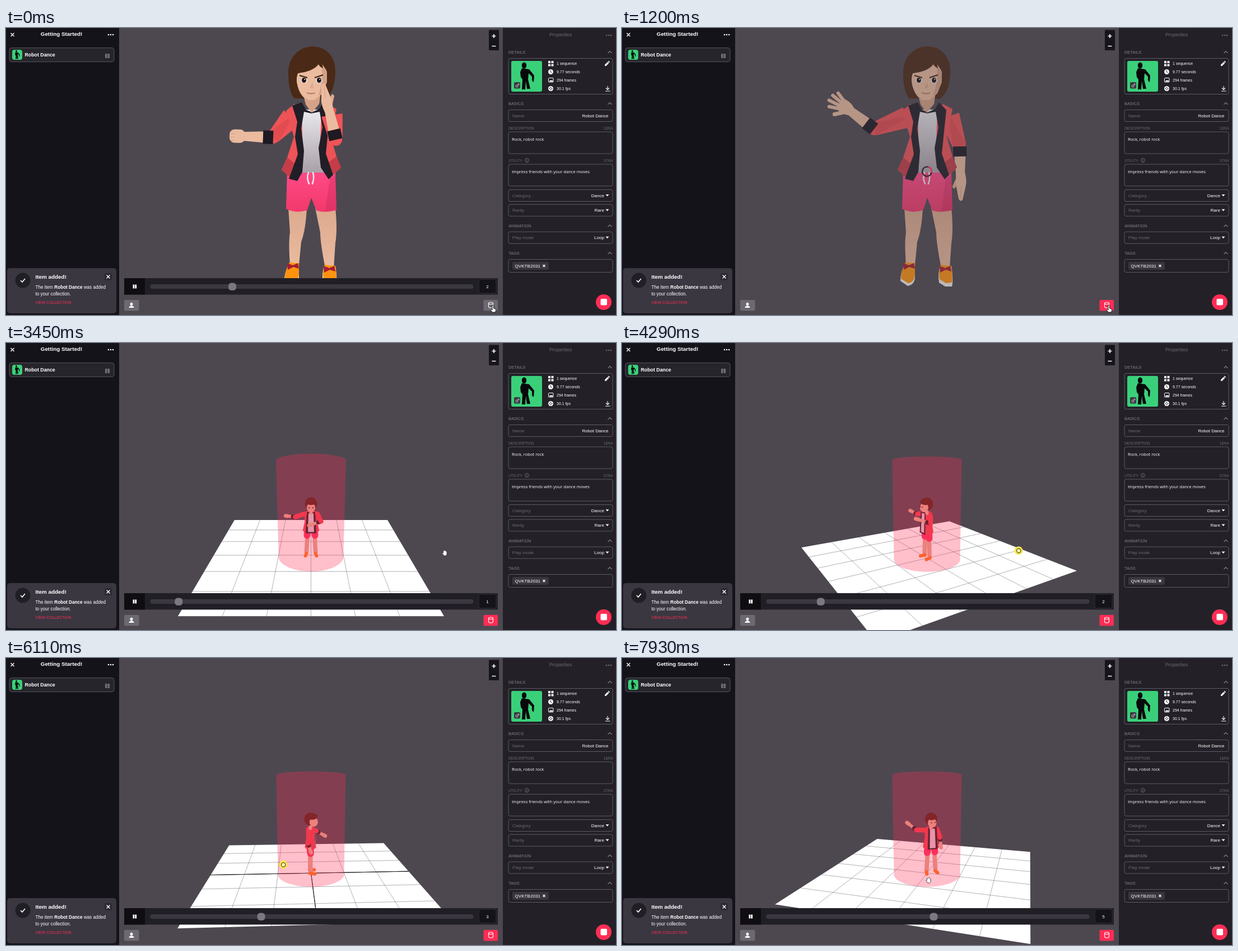
Write an HTML page with a canvas that moves like this. It is 1089 px wide and 514 px high and loops after 8 s.

```html
<!DOCTYPE html>
<html lang="en">
<head>
<meta charset="utf-8">
<title>Dance editor</title>
<style>
html, body { margin: 0; width: 100%; height: 100%; overflow: hidden; background: #4d4850; }
canvas { display: block; }
</style>
</head>
<body>
<canvas id="stage" width="1089" height="514"></canvas>
<script>
const g = document.getElementById('stage').getContext('2d');
const LOOP = 8000, LOAD = 930, SCENE = 2580, RATE = 0.0554;
const BG = '#4d4850', RED = '#ff2d55', INK = '#232028', SKIN = '#eabb9f', COAT = '#ee5357';
const SANS = '"Liberation Sans", Arial, sans-serif', HUMAN = '"Open Sans", sans-serif';

// ---------- helpers ----------
const lerp = (a, b, k) => a + (b - a) * k;
function at(keys, t) {
  if (t <= keys[0][0]) return keys[0].slice(1);
  const i = keys.findIndex(k => k[0] > t);
  if (i < 0) return keys[keys.length - 1].slice(1);
  const a = keys[i - 1], b = keys[i], k = (t - a[0]) / (b[0] - a[0]);
  return a.slice(1).map((v, j) => lerp(v, b[j + 1], k));
}
function paint(path, fill, stroke, width = 1) {
  if (fill) { g.fillStyle = fill; g.fill(path); }
  if (stroke) { g.strokeStyle = stroke; g.lineWidth = width; g.stroke(path); }
}
const shape = (d, fill, stroke, width) => paint(new Path2D(d), fill, stroke, width);
function box(x, y, w, h, r, fill, stroke) {
  const p = new Path2D();
  p.roundRect(x, y, w, h, r);
  paint(p, fill, stroke);
}
function oval(x, y, rx, ry, fill, stroke, width) {
  const p = new Path2D();
  p.ellipse(x, y, rx, ry, 0, 0, 7);
  paint(p, fill, stroke, width);
}
function poly(pts, fill, stroke, width) {
  const p = new Path2D();
  pts.forEach(q => p.lineTo(q[0], q[1]));
  p.closePath();
  paint(p, fill, stroke, width);
}
function text(s, x, y, size, color, { bold = false, align = 'left', font = SANS } = {}) {
  g.font = `${bold ? 'bold ' : ''}${size}px ${font}`;
  g.textAlign = align;
  g.textBaseline = 'middle';
  g.fillStyle = color;
  g.fillText(s, x, y + 0.5);
  return x + g.measureText(s).width;
}
function fade(y0, y1, a, b) {
  const f = g.createLinearGradient(0, y0, 0, y1);
  f.addColorStop(0, a);
  f.addColorStop(1, b);
  return f;
}
const cross = (x, y, r, color = '#fff') =>
  shape(`M${x - r},${y - r}l${2 * r},${2 * r}m0,${-2 * r}l${-2 * r},${2 * r}`, null, color, 1.4);

// ---------- large figure ----------
const HANDS = {
  fist() {
    box(-3, -12, 28, 24, 9, SKIN);
    shape('M15,-8h8M16,-2h8M15,4h8', null, '#d19f86', 1);
  },
  flat() {
    shape('M5,6L24,15L28,12L18,2Z', '#dda98d');
    shape('M-2,-8Q14,-12 24,-9L48,-3Q52,1 46,4L22,8L-2,8Z', SKIN);
    shape('M24,-1L46,1', null, '#d3a18a', 1);
  },
  spread() {
    shape('M-3,-8Q8,-14 22,-12L23,10Q8,14 -3,8Z', SKIN);
    g.lineCap = 'round';
    shape('M18,-9L34,-17M20,-4L41,-8M20,2L41,3M18,7L36,12', null, SKIN, 6);
    shape('M6,-8L18,-22', null, SKIN, 7);
    g.lineCap = 'butt';
  }
};
function arm(sx, sy, ex, ey, wx, wy, hand) {
  const across = (dx, dy, w) => { const l = Math.hypot(dx, dy) || 1; return [-dy / l * w, dx / l * w]; };
  const len = Math.hypot(wx - ex, wy - ey), k = Math.min(0.8, 18 / len);
  const cx = lerp(ex, wx, k), cy = lerp(ey, wy, k);
  const strip = (x0, y0, a, x1, y1, b, fill) => poly(
    [[x0 + a[0], y0 + a[1]], [x1 + b[0], y1 + b[1]], [x1 - b[0], y1 - b[1]], [x0 - a[0], y0 - a[1]]], fill);
  const s = across(ex - sx, ey - sy, 19), e = across(wx - ex, wy - ey, 12), w = across(wx - ex, wy - ey, 8);
  oval(ex, ey, 11, 11, COAT);
  const up = across(ex - sx, ey - sy, 12);
  strip(sx, sy, s, ex, ey, up, COAT);
  strip(sx, sy, [s[0] * 0.1, s[1] * 0.1], ex, ey, up, 'rgba(150,35,45,.14)');
  strip(cx, cy, w.map(v => v * 1.25), wx, wy, w, SKIN);
  strip(ex, ey, e, cx, cy, e, '#1d1a22');
  g.save();
  g.translate(wx, wy);
  g.rotate(Math.atan2(wy - ey, wx - ex));
  HANDS[hand]();
  g.restore();
}
const DANCE = [
  [70, 477, 196, 424, 194, 589, 200, 577, 148],
  [420, 480, 204, 430, 215, 596, 200, 574, 165],
  [900, 496, 216, 486, 262, 606, 202, 580, 222]
];
const WAVE = [450, 181, 407, 148, 603, 212, 604, 260];

function head(dx) {
  g.save();
  g.translate(dx, 0);
  shape('M504,82C503,55 521,33 548,33C575,34 589,54 588,80C587,104 581,120 569,127L514,126C506,114 504,98 504,82Z', '#4a2a16');
  shape('M530,116L535,137L546,152L559,136L562,116Z', '#d6a287');
  shape('M519,82L519,96Q521,112 530,123L540,129H551L565,117L573,95L572,76L562,61Q548,72 519,82Z', SKIN);
  shape('M563,66L573,78V97L566,115L557,122Q568,92 563,66Z', '#d3a189');
  shape('M505,92Q508,70 530,58Q552,50 561,44L566,72Q560,70 558,65Q548,78 521,81Q517,93 519,108Q508,105 505,92Z', '#4a2a16');
  for (const x of [532, 559]) {
    oval(x, 94, 6, 4.5, '#f3e4dc');
    oval(x, 93.5, 4, 4.5, '#17131a');
    oval(x + 1.2, 92, 1, 1, '#fff');
  }
  shape('M524,85L538,89M551,89L566,84', null, '#38200f', 2);
  shape('M547,97L542,107L549,108Z', '#dba88e');
  shape('M537,116Q545,119 552,116', null, '#b9725f', 1.8);
  g.restore();
}
function dancer(t) {
  const waving = t >= LOAD, pose = waving ? WAVE : at(DANCE, t);
  // legs and shoes
  shape('M504,322L537,322Q535,362 527,383L523,424H507Q504,384 507,366Z', fade(320, 425, '#dca98e', SKIN));
  shape('M552,322H588Q592,362 588,385L585,430H570Q561,385 561,366Z', fade(320, 430, '#dca98e', SKIN));
  shape('M506,420Q496,441 497,453L510,462Q522,460 523,447V421Z', '#f3f0f0');
  shape('M506,420Q497,438 498,449L511,457Q521,456 523,442V421Z', '#ff930f');
  shape('M569,424Q563,438 566,456L577,463H589Q592,452 588,426Z', '#f3f0f0');
  shape('M569,424Q564,437 567,450L578,457L589,456Q591,446 588,426Z', '#ff930f');
  for (const [x, y] of [[512, 427], [577, 432]])
    shape(`M${x - 10},${y - 6}l10,4l9,-4l2,10l-10,-3l-10,5z`, '#a51c33');
  // shorts
  shape('M502,258L500,324Q519,333 538,326L545,304L554,327Q573,332 590,326L588,258Z', fade(260, 328, '#ff4a86', '#f2396c'));
  shape('M578,270L570,328L590,326V262Z', 'rgba(150,20,70,.18)');
  if (waving) arm(508, 160, ...pose.slice(0, 4), 'spread');
  else arm(510, 160, ...pose.slice(0, 4), 'fist');
  if (waving) arm(584, 158, ...pose.slice(4), 'flat');
  // jacket, shirt, collar
  shape('M524,146H567L563,200L570,259H524L527,200Z', fade(150, 258, '#e9e7ec', '#aaa1a8'));
  shape('M515,136L500,148L514,195L502,232L492,254L512,272L530,230L528,150Z', COAT);
  shape('M573,136L590,145L580,195L590,230L598,250L576,270L560,230L563,150Z', COAT);
  shape('M502,232L492,254L512,272L518,245ZM590,230L598,250L576,270L570,245Z', '#c53d49');
  shape('M528,133L511,139L520,168L516,195L521,226L505,270L520,274L529,258L532,220L527,180L532,150L545,153L560,150L565,178L558,215L562,250L576,271L584,263L571,225L575,185L579,147L566,133L559,145L546,151L535,146Z', '#211e27');
  g.lineCap = 'round';
  shape('M540,259Q536,268 541,279M548,259Q551,268 547,279', null, '#f3e8ee', 2.6);
  g.lineCap = 'butt';
  head(waving ? -2 : lerp(0, -2, t / LOAD));
  if (!waving) arm(582, 156, ...pose.slice(4), 'flat');
}
function spinner(t) {
  const a = t / 1000 * Math.PI * 2 - Math.PI * 0.8;
  oval(544.5, 257, 8.5, 8.5, null, '#26232a', 2);
  const p = new Path2D();
  p.arc(544.5, 257, 8.5, a, a + 1.5);
  paint(p, null, RED, 2);
}

// ---------- orbit scene ----------
// time, azimuth, sine of elevation, pointer x, pointer y
const VIEW = [
  [2700, 360, .272, 870, 503], [3250, 360, .272, 783, 376], [3500, 360, .272, 783, 376],
  [4150, 312, .175, 718, 372], [5070, 248.2, .175, 653, 370], [6110, 92.9, .175, 495, 370],
  [6950, 16.7, .175, 429, 370], [7560, -21, .175, 392, 370], [7720, -16.3, .175, 400, 370],
  [7930, -16.3, .175, 547, 398]
];
// time, body turn, shift, then left elbow, left hand, right elbow, right hand
const MOVES = [
  [3450, 0, 0, -.47, 1.28, .05, -.72, 1.35, .15, .3, 1.12, 0, -.03, 1.1, .25],
  [5070, 0, 0, -.5, 1.28, .05, -.78, 1.32, .1, .3, 1.22, .12, .15, 1.47, .5],
  [6110, 0, -.02, -.26, 1.02, -.08, -.25, .76, 0, .25, 1.25, .2, .2, 1.12, .44],
  [6950, 8, .04, -.35, 1.22, .1, -.5, 1.42, .1, .29, 1.12, 0, .31, .88, .05],
  [7930, 34, .12, -.42, 1.36, -.1, -.68, 1.58, -.1, .28, 1.1, 0, .3, .82, .05]
];
function camera(sin) {
  const cos = Math.sqrt(1 - sin * sin), target = 2.175;
  return (x, y, z) => {
    const depth = 10.1 + target * sin - cos * z - sin * y, k = 618 / depth;
    return [544.5 + x * k, 259 + (target * cos - y * cos + sin * z) * k, k];
  };
}
const spin = (eye, a, dx = 0) => ([x, y, z]) =>
  eye(x * Math.cos(a) + z * Math.sin(a) + dx, y, z * Math.cos(a) - x * Math.sin(a));

function floor(eye, a) {
  const put = spin(eye, a);
  poly([[-3, 0, -3], [3, 0, -3], [3, 0, 3], [-3, 0, 3]].map(put), '#fff');
  for (let i = -2; i < 3; i++) {
    const dark = !i && Math.abs(Math.sin(a)) > .97;
    for (const ends of [[[i, 0, -3], [i, 0, 3]], [[-3, 0, i], [3, 0, i]]])
      poly(ends.map(put), null, dark ? '#222' : 'rgba(70,66,72,.45)', dark ? 1 : .5);
  }
}
function smallDancer(t, eye, azimuth) {
  const [turn, dx, ...j] = at(MOVES, t), a = azimuth + turn * Math.PI / 180;
  const put = spin(eye, a, dx), cos = Math.cos(a), sin = Math.sin(a);
  const limb = (p, q, w, color) => {
    const [x0, y0, k] = put(p), [x1, y1] = put(q);
    shape(`M${x0},${y0}L${x1},${y1}`, null, color, w * k);
  };
  const mid = (p, q, k) => p.map((v, i) => lerp(v, q[i], k));
  const skin = '#e3a58e', coat = '#ec3d4b';
  g.lineCap = 'round';
  for (const s of sin > 0 ? [1, -1] : [-1, 1]) {
    limb([s * .11, .62, 0], [s * .14, .12, 0], .13, skin);
    limb([s * .14, .05, -.02], [s * .17, .04, .13], .1, '#ff7a1c');
    limb([s * .1, .86, 0], [s * .12, .66, 0], .2, '#f8325d');
  }
  const drawArm = (side, elbow, hand) => {
    const cuff = mid(elbow, hand, .25);
    limb(elbow, hand, .09, skin);
    limb(elbow, cuff, .13, '#2a1c25');
    limb([side * .19, 1.36, 0], elbow, .14, coat);
    limb(mid(elbow, hand, .92), mid(elbow, hand, 1.1), .11, skin);
  };
  const torso = () => {
    const rows = [[1.46, .09], [1.41, .19], [1.1, .19], [.82, .25], [.77, .2]];
    const wide = w => Math.hypot(w * cos, w * .65 * sin);
    poly([...rows.map(([y, w]) => eye(dx - wide(w), y, 0)),
      ...rows.reverse().map(([y, w]) => eye(dx + wide(w), y, 0))], coat);
    if (cos < -.15) return;
    const panel = (w, top, low, fill) =>
      poly([[-w, top, .13], [w, top, .13], [w * 1.2, low, .16], [-w * 1.2, low, .16]].map(put), fill);
    panel(.13, 1.46, .8, '#2a1c25');
    panel(.075, 1.42, .84, '#d9c3cb');
  };
  const skull = () => {
    const [x, y, k] = put([0, 1.68, 0]), [fx, fy] = put([0, 1.59, .1]);
    const face = () => oval(fx, fy, .125 * k, .14 * k, skin);
    limb([0, 1.4, 0], [0, 1.56, .02], .1, skin);
    if (cos < -.2) face();
    oval(x, y, .18 * k, .19 * k, '#4d2317');
    if (cos >= -.2) {
      face();
      const [hx, hy] = put([0, 1.76, .05]);
      oval(hx, hy, .16 * k, .1 * k, '#4d2317');
    }
    if (cos > .3) for (const s of [-.055, .055]) {
      const [ex, ey] = put([s, 1.62, .2]);
      oval(ex, ey, 1, 1.1, '#25151a');
    }
  };
  const l = [j.slice(0, 3), j.slice(3, 6)], r = [j.slice(6, 9), j.slice(9)];
  const near = p => put(mid(p[0], p[1], .5))[2];
  [[near(l), () => drawArm(-1, ...l)], [near(r), () => drawArm(1, ...r)], [put([0, 1.15, 0])[2], torso]]
    .sort((p, q) => p[0] - q[0]).forEach(p => p[1]());
  skull();
  g.lineCap = 'butt';
}
function cylinder(eye) {
  const ring = [];
  for (let i = 0; i <= 40; i++) {
    const a = i / 40 * Math.PI;
    ring.push([Math.cos(a), Math.sin(a)]);
  }
  poly([...ring.map(([x, z]) => eye(x, 0, z)), ...ring.reverse().map(([x, z]) => eye(x, 3, -z))],
    'rgba(255,45,85,.3)');
}
function orbit(t) {
  const [deg, tilt] = at(VIEW, t), eye = camera(tilt), a = deg * Math.PI / 180;
  floor(eye, a);
  smallDancer(t, eye, a);
  cylinder(eye);
}

// ---------- interface ----------
function thumb(x, y, size) {
  g.save();
  g.translate(x, y);
  g.scale(size / 55, size / 55);
  box(0, 0, 55, 55, size > 30 ? 3 : 12, '#3ad07a');
  oval(23, 8, 4.2, 5.5, '#08090a');
  shape('M19,13L32,15L41,26L40,38L37,35V28L31,22L30,33L34,50H28L26,36L25,51H19L20,33L17,29L16,20Z', '#08090a');
  g.restore();
}
function dots(x, y, color) {
  for (const d of [-4, 0, 4]) oval(x + d, y, 1.3, 1.3, color);
}
function pause(x, y, w, h, color) {
  g.fillStyle = color;
  g.fillRect(x, y, w, h);
  g.fillRect(x + w + 1, y, w, h);
}
function leftPanel() {
  g.fillStyle = '#15131a';
  g.fillRect(0, 0, 202, 514);
  cross(11.5, 12, 3);
  text('Getting Started!', 99, 11, 9.9, '#fff', { bold: true, align: 'center' });
  dots(187, 12, '#fff');
  box(6, 35.5, 187, 25, 4, '#27252c', '#54515a');
  thumb(11, 39, 18);
  text('Robot Dance', 33.5, 48, 8.8, '#fff', { bold: true });
  pause(177, 46, 3.5, 8, '#6f6c75');

  box(2, 430, 195, 81, 5, '#3a3741');
  oval(30, 452, 13.5, 13.5, '#211f26');
  shape('M26,452l3,3l5,-6', null, '#fff', 1.7);
  text('Item added!', 52.5, 446, 9.9, '#fff', { bold: true });
  box(176, 439, 13, 13, 3, '#2c2932');
  cross(182.5, 445.5, 3);
  let x = text('The item ', 52.5, 464, 8.15, '#fff');
  x = text('Robot Dance', x, 464, 8.15, '#fff', { bold: true });
  text(' was added', x, 464, 8.15, '#fff');
  text('to your collection.', 52.5, 476, 8.15, '#fff');
  text('VIEW COLLECTION', 52.5, 492, 6.95, RED);
}
const GREY = '#6b6872', LINE = '#5d5a63';
function section(label, y) {
  text(label, 897, y, 7.4, '#85828b');
  shape(`M1074.5,${y + 2}l3.5,-3.5l3.5,3.5`, null, '#85828b', 1.1);
}
function field(label, value, y, list) {
  box(897, y + .5, 186, 21, 3, null, LINE);
  text(label, 904, y + 11, 8.1, GREY);
  text(value, list ? 1068 : 1075.5, y + 11, 8.05, '#fff', { align: 'right' });
  if (list) shape(`M1070.5,${y + 9}h6l-3,3.5z`, '#fff');
}
function note(label, count, body, y) {
  text(label, 897, y, 6.7, GREY);
  text(count, 1083.5, y, 6.7, GREY, { align: 'right' });
  box(897, y + 6.5, 186, 39, 3, null, LINE);
  text(body, 903, y + 20, 7.6, '#fff', { font: HUMAN });
}
function rightPanel() {
  g.fillStyle = '#232127';
  g.fillRect(887, 0, 202, 514);
  text('Properties', 990, 12, 8.8, GREY, { align: 'center' });
  dots(1076, 13, GREY);
  section('DETAILS', 43);
  box(897, 54.5, 186, 64, 3, null, LINE);
  thumb(902, 59, 55);
  box(907, 97, 11, 11.5, 2, '#3b3941');
  oval(912, 104, 1.9, 1.9, null, '#ddd', .8);
  shape('M913.3,102.7l2.5,-2.5m-2.3,0h2.3v2.3', null, '#ddd', .8);
  ['1 sequence', '9.77 seconds', '294 frames', '30.1 fps'].forEach((s, i) =>
    text(s, 983, 63.5 + i * 15, 7, '#fff'));
  for (const [x, y] of [[968, 59], [973.5, 59], [968, 64.5], [973.5, 64.5]]) box(x, y, 4, 4, .5, '#fff');
  oval(972.5, 78.5, 4.5, 4.5, '#fff');
  shape('M972.5,75.5v3.3l2.3,1.4', null, '#232127', 1);
  box(968.5, 89.5, 8.5, 7.5, 1, null, '#fff');
  shape('M969.5,96l2.5,-3l1.5,1.5l1.2,-1.5l2,3z', '#fff');
  oval(972.5, 108.5, 4.5, 4.5, '#fff');
  for (const [x, y] of [[-2, 0], [2, 0], [0, -2], [0, 2]]) oval(972.5 + x, 108.5 + y, .9, .9, '#232127');
  shape('M1069,68v-2.3l5,-5l2.3,2.3l-5,5zM1074.6,60l1.2,-1.2l2.4,2.3l-1.2,1.2z', '#fff');
  shape('M1074,104v6.5m-3,-3l3,3l3,-3M1070,113h8.5', null, '#fff', 1.1);

  section('BASICS', 135);
  field('Name', 'Robot Dance', 146);
  note('DESCRIPTION', '16/64', 'Rock, robot rock', 179.5);
  note('UTILITY', '37/64', 'Impress friends with your dance moves', 237.5);
  oval(930, 237, 3.5, 3.5, null, GREY, 1);
  shape('M930,236.3v3M930,234.6v.9', null, GREY, 1);
  field('Category', 'Dance', 289, true);
  field('Rarity', 'Rare', 315.5, true);
  section('ANIMATION', 354);
  field('Play mode', 'Loop', 364.5, true);
  section('TAGS', 403);
  box(897, 414.5, 186, 23, 3, null, LINE);
  box(904, 419, 65, 14, 2, '#39363f');
  text('QVKTB2031', 908.5, 426, 8.1, '#fff');
  cross(960.5, 426, 2);
  oval(1067, 491, 14, 14, RED);
  box(1061.5, 485, 11.5, 11.5, 2, '#fff');
}
function tools(t) {
  box(862, 3.5, 18, 36.5, 1, '#17151b');
  shape('M867.5,14.5h7m-3.5,-3.5v7M867.5,32.5h7', null, '#fff', 1.7);
  box(211, 487, 26.5, 19.5, 2, '#6c6972');
  oval(224, 494.5, 2.4, 2.7, '#fff');
  shape('M219.5,501q0,-3.5 4.5,-3.5t4.5,3.5z', '#fff');
  box(852.5, 487, 25.5, 19.5, 2, t < LOAD ? '#6c6972' : RED);
  oval(865.5, 493, 4, 1.7, null, '#fff', 1.1);
  shape('M861.5,493v6.3q0,1.8 4,1.8t4,-1.8V493', null, '#fff', 1.1);
}
function player(t) {
  const x = t < LOAD ? 404 + t * RATE : 260 + (t - SCENE) * RATE;
  g.fillStyle = '#211f26';
  g.fillRect(211, 448, 667, 29.5);
  g.fillStyle = '#0f0d12';
  g.fillRect(211, 448, 37, 29.5);
  pause(226.5, 459.5, 2.8, 7, '#fff');
  box(257.5, 459, 577, 8, 4, '#3b3841');
  box(x - 7, 456.5, 14, 13.5, 5.5, '#7b7881');
  box(844, 450, 31, 25, 2, '#15131a', '#322f38');
  text(String(Math.round((x - 264) / 577 * 9.77)), 859.5, 463, 8.1, '#fff', { align: 'center' });
}
function pointer(t) {
  const [, , x, y] = at(VIEW, t), drag = t > 3520 && t < 7720;
  g.save();
  g.translate(x, y);
  g.lineJoin = 'round';
  if (drag) {
    oval(0, 0, 7.5, 7.5, '#f7e64a');
    shape('M-3.5,-1Q-3,-3.5 0,-3.5Q4,-3.5 4,0Q4,4 1,4H-1.5Q-4,1.5 -3.5,-1Z', '#fff3a0', '#2b2a20', 1);
  } else if (t < 2800) {
    shape('M-2,-6Q-.5,-7.5 .5,-6V-1L4,0Q5,.5 4.5,3L3.5,6H-2L-5,1.5Q-4.5,0 -3,1L-2,2Z', '#fff', '#111', .9);
  } else {
    shape('M-2.5,-3Q-1.5,-5 -.5,-4Q.5,-5.5 1.5,-4Q3,-4.5 3,-2.5Q4.5,-2.5 4.2,0Q4,5 1.5,5H-1L-4.5,.5Q-4,-1.2 -2.5,.3Z', '#fff', '#222', .8);
  }
  g.restore();
}

function draw(now) {
  const t = now % LOOP, loading = t >= LOAD && t < SCENE;
  g.fillStyle = BG;
  g.fillRect(0, 0, 1089, 514);
  if (t < SCENE) dancer(t); else orbit(t);
  if (loading) {
    g.globalAlpha = .33 * Math.min(1, (t - LOAD) / 150);
    g.fillStyle = BG;
    g.fillRect(202, 0, 685, 514);
    g.globalAlpha = 1;
    spinner(t);
  } else player(t);
  tools(t);
  leftPanel();
  rightPanel();
  pointer(t);
}
const start = performance.now();
(function tick() {
  draw(performance.now() - start);
  requestAnimationFrame(tick);
})();
</script>
</body>
</html>
```
